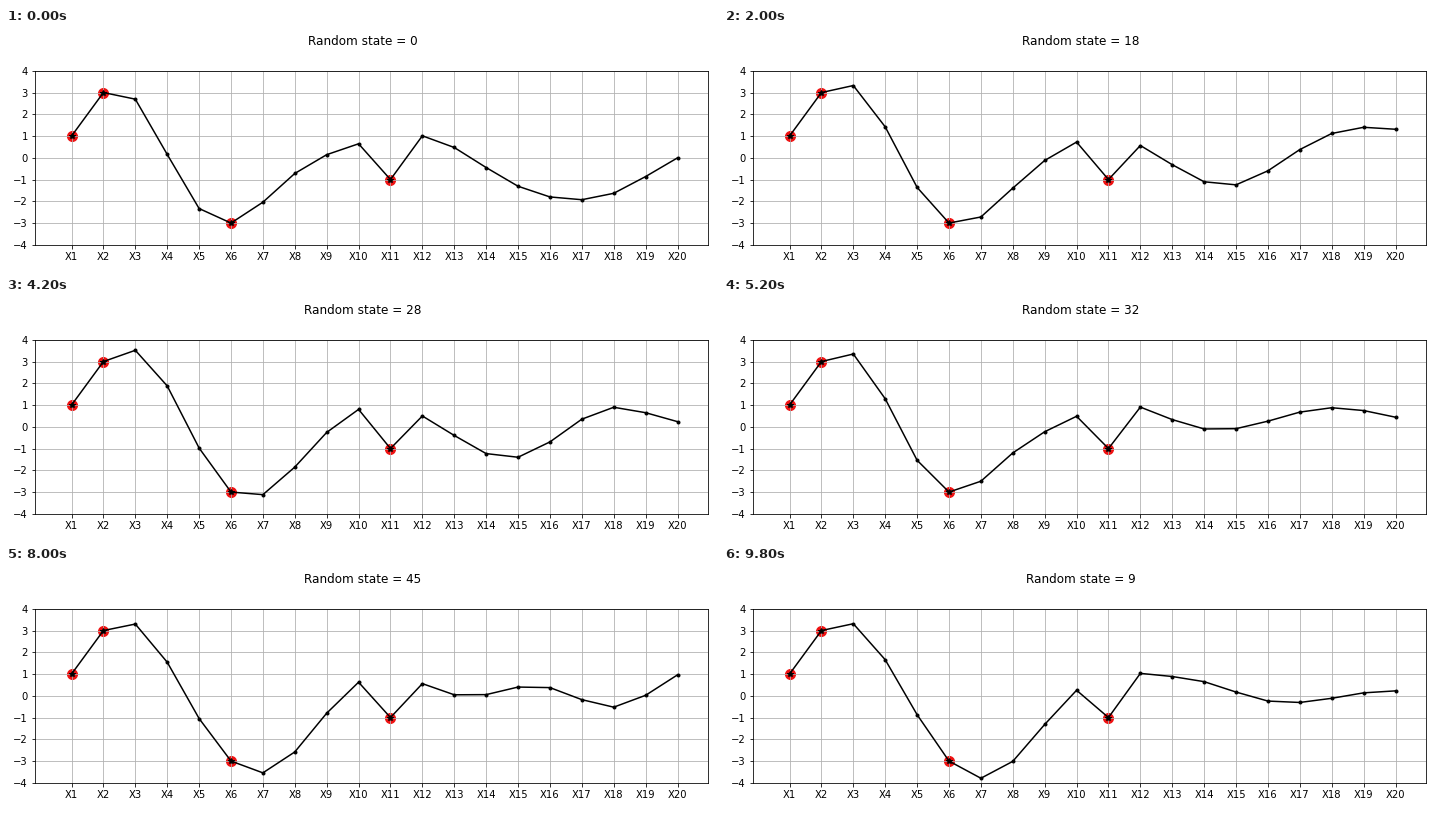
A matplotlib script for the animation above (10 s loop, 712 by 241 pixels).

```python
import numpy as np
import matplotlib.pyplot as plt
from matplotlib.animation import FuncAnimation

W, H, DPI = 712, 241, 72
LEFT, RIGHT, TOP, BOTTOM = 28.95, 701.81, 42.8, 216.8
N = 20
SCALE = 2.0

plt.rcParams["font.family"] = "DejaVu Sans"

known = np.array([0, 1, 5, 10])
shown = np.array([1, 3, -3, -1])
given = np.array([1, 3, -3, 1])  # the walk is drawn as if X11 were +1
free = np.setdiff1d(np.arange(N), known)


def kernel(a, b):
    return np.exp(-0.5 * ((a[:, None] - b[None, :]) / SCALE) ** 2)


# Gaussian process at the free points, given the known ones
cross = kernel(free, known)
gain = cross @ np.linalg.inv(kernel(known, known))
mean = gain @ given
cov = kernel(free, free) - gain @ cross.T

# Seeds run in text order: 0, 1, 10, 11, ...
seeds = sorted(range(50), key=str)


def walk(seed):
    y = np.empty(N)
    y[known] = shown
    y[free] = np.random.RandomState(seed).multivariate_normal(
        mean, cov, check_valid="ignore")
    return y


fig = plt.figure(figsize=(W / DPI, H / DPI), dpi=DPI, facecolor="white")
ax = fig.add_axes([LEFT / W, 1 - BOTTOM / H,
                   (RIGHT - LEFT) / W, (BOTTOM - TOP) / H])
ax.set_xlim(-1.147, 19.95)
ax.set_ylim(-4, 4)
ax.set_xticks(range(N), [f"X{i + 1}" for i in range(N)])
ax.set_yticks(range(-4, 5))
ax.grid(True)

ax.scatter(known, shown, s=100, c="#ee1111")
ax.plot(known, shown, "k*")
line, = ax.plot(range(N), walk(0), "k.-")
title = fig.text(0.5 + 1 / W, 1 - 17 / H, "", fontsize=12,
                 ha="center", va="baseline")


def draw(i):
    line.set_ydata(walk(seeds[i]))
    title.set_text(f"Random state = {seeds[i]}")
    return line, title


anim = FuncAnimation(fig, draw, frames=len(seeds), interval=200,
                     repeat=True, repeat_delay=0)
plt.show()
```
